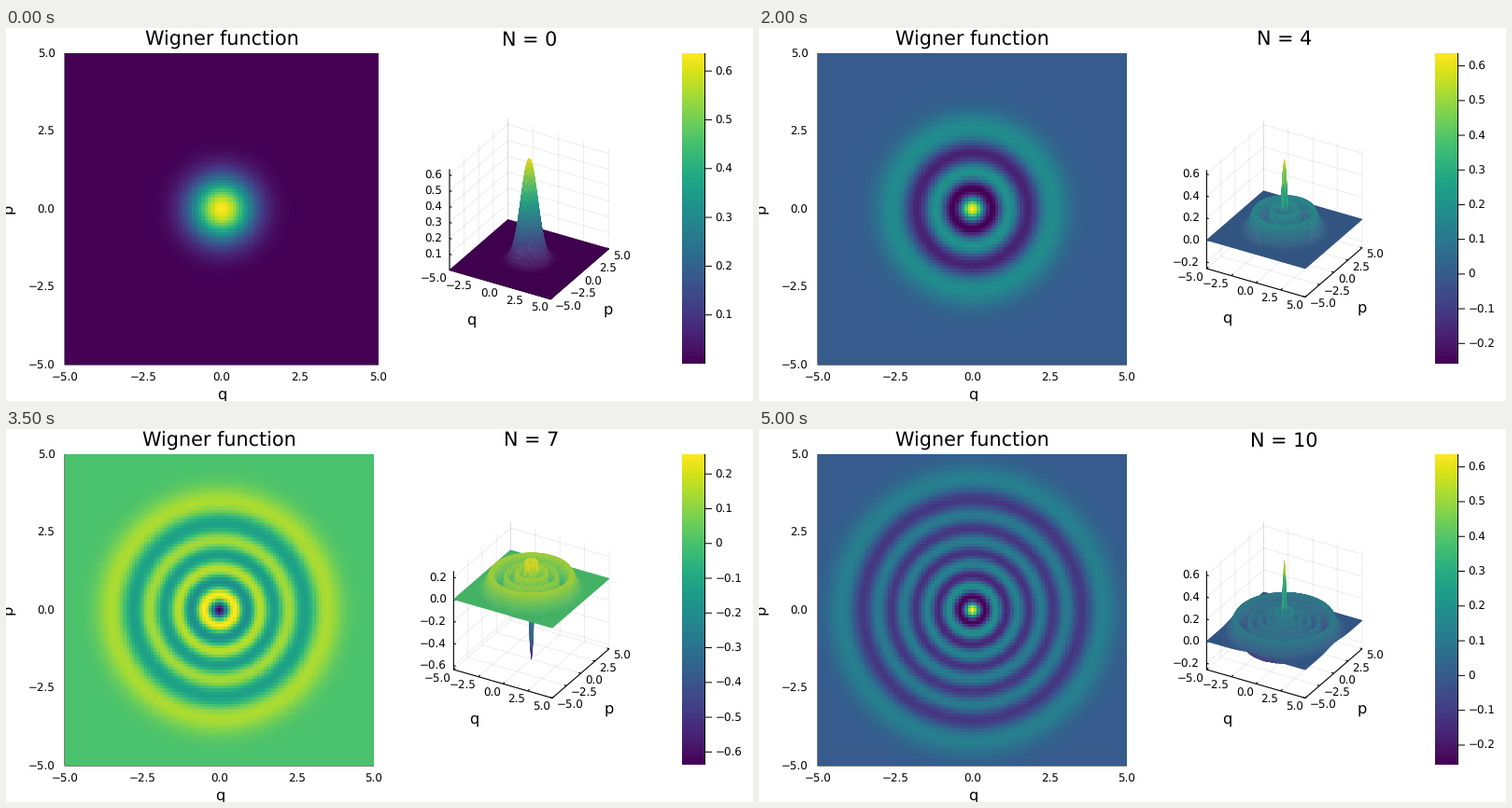
A matplotlib script that plays this animation: 800x400 px, repeating every 5500 ms.

```python
import numpy as np
import matplotlib.pyplot as plt
from matplotlib.animation import FuncAnimation
from matplotlib.collections import LineCollection, PolyCollection

plt.rcParams["font.family"] = "DejaVu Sans"
plt.rcParams["text.hinting"] = "none"

W, H, DPI = 800, 400, 100
PX = 72 / DPI
LEVELS = 11
LIM = 5.0
TICKS = np.linspace(-LIM, LIM, 5)
TICK_SIZE, LABEL_SIZE, TITLE_SIZE = 11.9, 16.3, 20.8
LEFT, TOP, BOTTOM = 63, 27, 361
BAR_L, BAR_R, BAR_B = 724, 748, 360
CMAP = plt.get_cmap("viridis")

axis = np.linspace(-LIM, LIM, 101)
Q, P = np.meshgrid(axis, axis)
R2 = Q**2 + P**2

# mesh cells ordered from far to near
near = (Q - np.sqrt(3) * P)[:-1, :-1].ravel()
ORDER = np.argsort(near, kind="stable")

fig = plt.figure(figsize=(W / DPI, H / DPI), dpi=DPI, facecolor="white")
ax = fig.add_axes([0, 0, 1, 1])


def laguerre(n, x):
    prev, cur = np.zeros_like(x), np.ones_like(x)
    for k in range(n):
        prev, cur = cur, ((2 * k + 1 - x) * cur - k * prev) / (k + 1)
    return cur


def wigner(n):
    return 2 / np.pi * (-1) ** n * np.exp(-R2) * laguerre(n, 2 * R2)


def fmt(v):
    return f"{v:.1f}".replace("-", "\u2212")


def steps(lo, hi, step):
    first, last = int(np.ceil(lo / step)), int(np.floor(hi / step))
    return [k * step for k in range(first, last + 1)]


def text(x, y, s, size, **kw):
    kw = {"ha": "center", "va": "baseline", **kw}
    ax.text(x, y, s, fontsize=size * PX, **kw)


def label(x, y, s, ha="center"):
    """Tick label whose digits are centred on y."""
    text(x, y + 0.365 * TICK_SIZE, s, TICK_SIZE, ha=ha)


def lines(segs, color="black", width=1.0, z=1):
    ax.add_collection(LineCollection(segs, colors=[color], linewidths=width * PX,
                                     snap=False, zorder=z), autolim=False)


def image(data, left, right, top, bottom):
    ax.imshow(data, cmap=CMAP, interpolation="nearest", aspect="auto", zorder=2,
              extent=(left, right, bottom, top))


def draw_map(w, right):
    lines([[(LEFT, TOP), (LEFT, BOTTOM), (right, BOTTOM)]])
    image(w, LEFT, right, TOP, BOTTOM)
    for t in TICKS:
        f = (t + LIM) / (2 * LIM)
        label(LEFT + f * (right - LEFT), 374, fmt(t))
        label(52.5, BOTTOM - f * (BOTTOM - TOP), fmt(t), ha="right")
    mid = (LEFT + right) / 2 + 0.3
    text(mid, 18.5, "Wigner function", TITLE_SIZE)
    text(mid, 399, "q", LABEL_SIZE)
    text(7.5, 194, "p", LABEL_SIZE, rotation=90, rotation_mode="anchor")


def draw_bar(lo, hi):
    image(np.linspace(1, 0, 256)[:, None], BAR_L, BAR_R, TOP, BAR_B)
    segs = [[(BAR_R + 0.5, TOP), (BAR_R + 0.5, BAR_B)]]
    for v in steps(lo, hi, 0.1):
        y = BAR_B - (v - lo) / (hi - lo) * (BAR_B - TOP)
        segs.append([(BAR_R, y), (BAR_R + 8, y)])
        label(759.5, y, "0" if abs(v) < 1e-9 else fmt(v), ha="left")
    lines(segs, z=3)


def draw_surface(w, lo, hi, cx, size, z_step):
    c, s = np.sqrt(3) / 2, 0.5
    eq = np.array([c, s * s]) * size
    ep = np.array([s, -c * s]) * size
    ez = np.array([0, -c]) * size
    origin = np.array([cx, 194.0]) - (eq + ep + ez) / 2

    def at(q, p, z):
        f = [np.asarray(v, float)[..., None]
             for v in ((q + LIM) / (2 * LIM), (p + LIM) / (2 * LIM), (z - lo) / (hi - lo))]
        return origin + f[0] * eq + f[1] * ep + f[2] * ez

    # grid on the floor and the two back walls
    zs = steps(lo, hi, z_step)
    grid = [[at(t, -LIM, lo), at(t, LIM, lo), at(t, LIM, hi)] for t in TICKS]
    grid += [[at(LIM, t, lo), at(-LIM, t, lo), at(-LIM, t, hi)] for t in TICKS]
    grid += [[at(-LIM, -LIM, z), at(-LIM, LIM, z), at(LIM, LIM, z)] for z in zs]
    lines(grid, (0, 0, 0, 0.1), 0.7)

    # axes with inward ticks
    uq, up = eq / np.hypot(*eq) * 2.5, ep / np.hypot(*ep) * 2.5
    segs = [[at(-LIM, -LIM, hi), at(-LIM, -LIM, lo), at(LIM, -LIM, lo), at(LIM, LIM, lo)]]
    for t in TICKS:
        a, b = at(t, -LIM, lo), at(LIM, t, lo)
        segs += [[a, a + up], [b, b - uq]]
        label(a[0] - 2.5, a[1] + 9, fmt(t), ha="right")
        label(b[0] + 4.5, b[1] + 7.3, fmt(t), ha="left")
    for z in zs:
        a = at(-LIM, -LIM, z)
        segs.append([a, a + uq])
        label(a[0] - 7.5, a[1], fmt(z), ha="right")
    lines(segs, width=1.1, z=2)

    mq, mp = at(0, -LIM, lo), at(LIM, 0, lo)
    text(mq[0] - 31, mq[1] + 43.5, "q", LABEL_SIZE)
    text(mp[0] + 30, mp[1] + 43.5, "p", LABEL_SIZE)

    pts = at(Q, P, w)
    quads = np.stack([pts[:-1, :-1], pts[:-1, 1:], pts[1:, 1:], pts[1:, :-1]], axis=2)
    corners = np.stack([w[:-1, :-1], w[:-1, 1:], w[1:, 1:], w[1:, :-1]])
    rgb = CMAP((corners.mean(axis=0) - lo) / (hi - lo))[..., :3] * 0.92
    steep = np.ptp(corners, axis=0) / (hi - lo) * c * size
    rgb += (1 - rgb) * 0.05 * np.clip(steep / 1.5, 0, 1)[..., None]
    ax.add_collection(PolyCollection(quads.reshape(-1, 4, 2)[ORDER],
                                     facecolors=rgb.reshape(-1, 3)[ORDER],
                                     edgecolors="face", linewidths=0.5 * PX, zorder=3),
                      autolim=False)


def draw(n):
    ax.clear()
    ax.axis("off")
    w = wigner(n)
    lo, hi = w.min(), w.max()
    ground = n == 0
    cx = 560.4 if ground else 562.7
    draw_map(w, 399 if ground else 394)
    draw_surface(w, lo, hi, cx, 125 if ground else 122, 0.1 if ground else 0.2)
    text(cx, 18.5, f"N = {n}", TITLE_SIZE)
    draw_bar(lo, hi)
    ax.set_xlim(0, W)
    ax.set_ylim(H, 0)
    return []


anim = FuncAnimation(fig, draw, frames=LEVELS, init_func=lambda: [], interval=500,
                     repeat=True, repeat_delay=0, blit=False)
plt.show()
```
